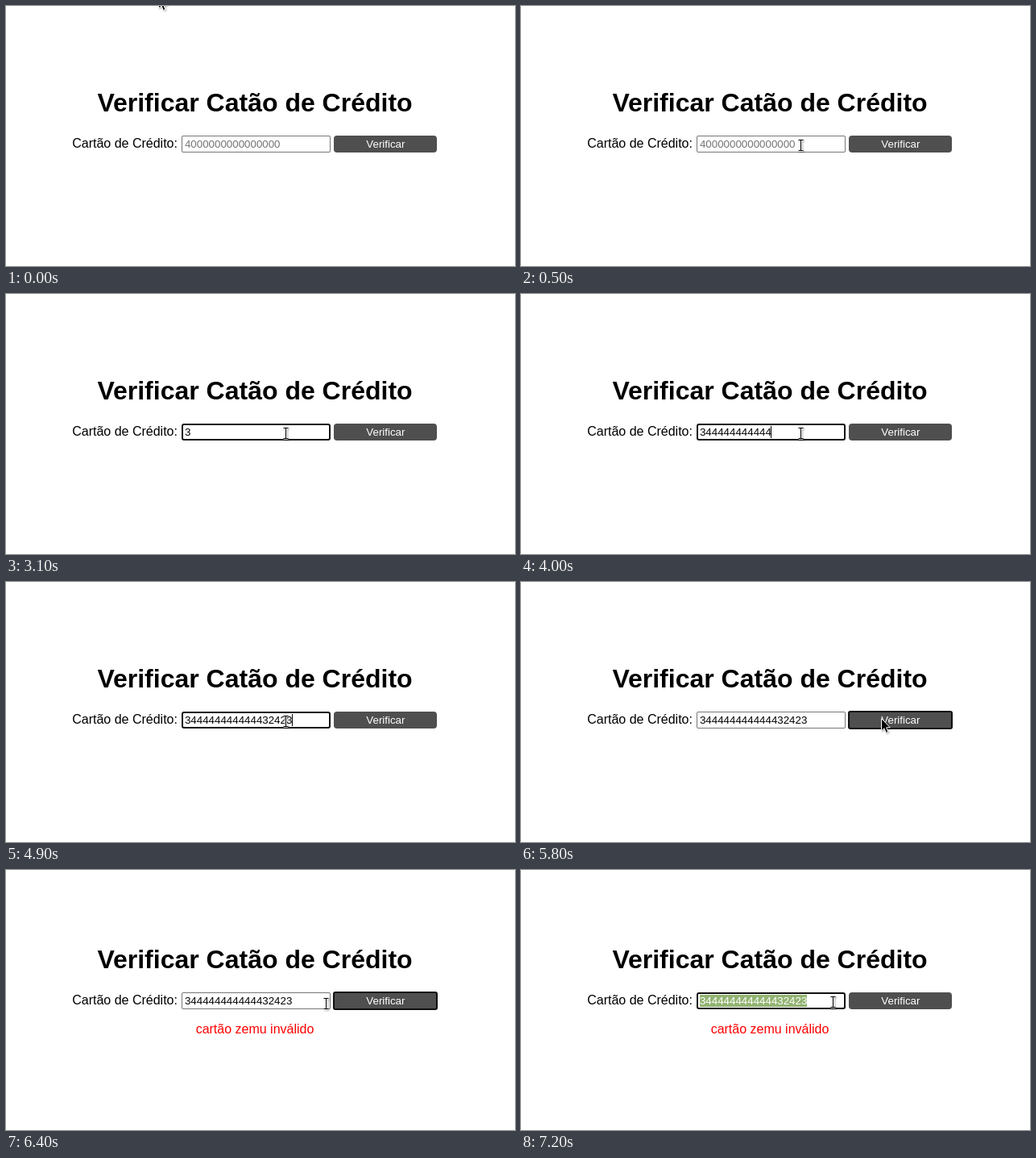
Write an HTML page that moves like this. It is 632 px wide and 323 px high and loops after 8000 ms.

```html
<!DOCTYPE html>
<html lang="pt">
<head>
<meta charset="utf-8">
<title>Verificar</title>
<style>
html, body { margin: 0; width: 100%; height: 100%; overflow: hidden; background: #fff; }
body { position: relative; font: 16px/17px "Liberation Sans", Arial, sans-serif; color: #000; }
body *, #button::after { position: absolute; box-sizing: border-box; white-space: pre; }
#form { left: 0; top: 0; width: 618px; height: 323px; }
h1 { margin: 0; left: 0; top: 102px; width: 618px; font: bold 32px/36px "Liberation Sans", Arial, sans-serif; text-align: center; }
#label { left: 82.2px; top: 162px; }
#field, #button { top: 161px; height: 21px; font-size: 13.3333px; line-height: 15px; }
#field { left: 218px; width: 185px; border-radius: 2px; box-shadow: inset 0 0 0 1px #767676; }
#field.hover { box-shadow: inset 0 0 0 1px #4f4f4f; }
#field.focus { border-radius: 3px; box-shadow: inset 0 0 0 2px #101010; }
#value { left: 3.95px; top: 3px; height: 15px; }
#value.hint { color: #757575; }
#value.selected { color: #fff; background: #92b372; }
#caret { top: 3px; width: 1px; height: 15px; background: #000; }
#button { left: 407.4px; width: 128px; padding-top: 3px; border-radius: 4px; background: #4f4f4f; color: #fff; text-align: center; }
#button.focus::after { content: ""; inset: -1px; border: 2px solid #101010; border-radius: 3px; }
#error { left: 0; top: 198px; width: 618px; text-align: center; color: #f00; }
svg { left: 0; top: 0; width: 1px; height: 1px; overflow: visible; filter: drop-shadow(1px 1px 1px rgba(0, 0, 0, .35)); }
#beam path { fill: none; stroke: #000; }
#beam .edge { stroke: #fff; stroke-width: 2.6; }
</style>
</head>
<body>
<div id="form">
  <h1>Verificar Catão de Crédito</h1>
  <div id="label">Cartão de Crédito:</div>
  <div id="field"><span id="value"></span><i id="caret"></i></div>
  <div id="button">Verificar</div>
  <div id="error">cartão zemu inválido</div>
</div>
<svg id="arrow"><path d="M.5 .5V16L4 12.8 6.3 18.4 8.9 17.3 6.6 11.8H11.3Z" fill="#000" stroke="#fff"/></svg>
<svg id="beam">
  <path class="edge" d="M-2.5 -6.5H3.5M-2.5 6.5H3.5M.5 -6.5V6.5"/>
  <path d="M-2.5 -6.5H3.5M-2.5 6.5H3.5M.5 -6.5V6.5"/>
</svg>
<script>
const LOOP = 8000, STEP = 100, BLINK = 600;
const CLICK = 1000, SUBMIT = 5800, REPLY = 5900, RECLICK = 6900, SELECT = 7200;
const DIGIT = 7.415, INDENT = 4;
const HINT = '4'.padEnd(16, '0');
const CARD = '3' + '4'.repeat(12) + '32423';

// Two single keys, one held down, then the last digits.
const held = Array.from({ length: 10 }, (_, i) => 3700 + STEP * Math.floor(i / 3));
const keys = [2400, 3200, ...held, 4100, 4200, 4300, 4600, 4900, 4900];

const moves = [
  { start: 0, end: 500, from: [189, -13], to: [347, 173] },
  { start: 5100, end: 5500, from: [347, 173], to: [447, 169] },
  { start: 6100, end: 6600, from: [447, 170], to: [387, 164] }
];

const $ = id => document.getElementById(id);
const [form, field, value, caret, button, error, arrow, beam] =
  ['form', 'field', 'value', 'caret', 'button', 'error', 'arrow', 'beam'].map($);
const show = (el, on) => { el.style.visibility = on ? 'visible' : 'hidden'; };
const mix = (a, b, p) => Math.round(a + (b - a) * p);

function pointer(t) {
  const { start, end, from, to } = moves.findLast(m => m.start <= t) || moves[0];
  const p = Math.max(0, Math.min(1, (t - start) / (end - start)));
  const x = mix(from[0], to[0], 1 - (1 - p) ** 2), y = mix(from[1], to[1], p);
  const top = t < REPLY ? 161 : 152;
  return { x, y, over: x >= 218 && x < 403 && y >= top && y < top + 21 };
}

function draw(t) {
  const { x, y, over } = pointer(t);
  const count = keys.filter(k => k <= t).length;
  const failed = t >= REPLY, selected = t >= SELECT;
  const typing = t >= CLICK && t < SUBMIT || t >= RECLICK;

  form.style.top = failed ? '-9px' : '0';
  show(error, failed);
  // The border reacts one step after the pointer arrives.
  field.className = typing ? 'focus' : pointer(t - STEP).over ? 'hover' : '';
  button.className = t >= SUBMIT && !typing ? 'focus' : '';

  value.textContent = count ? CARD.slice(0, count) : HINT;
  value.className = !count ? 'hint' : selected ? 'selected' : '';

  const lastInput = [CLICK, ...keys, RECLICK].findLast(k => k <= t);
  const lit = Math.floor((t - lastInput) / BLINK) % 2 === 0;
  caret.style.left = Math.floor(INDENT + count * DIGIT) + 'px';
  show(caret, typing && lit && !selected);

  for (const el of [arrow, beam]) el.style.transform = `translate(${x}px, ${y}px)`;
  show(arrow, !over);
  show(beam, over);
}

function tick() {
  const t = performance.now() % LOOP;
  draw(Math.floor(t / STEP) * STEP);
  requestAnimationFrame(tick);
}
tick();
</script>
</body>
</html>
```
